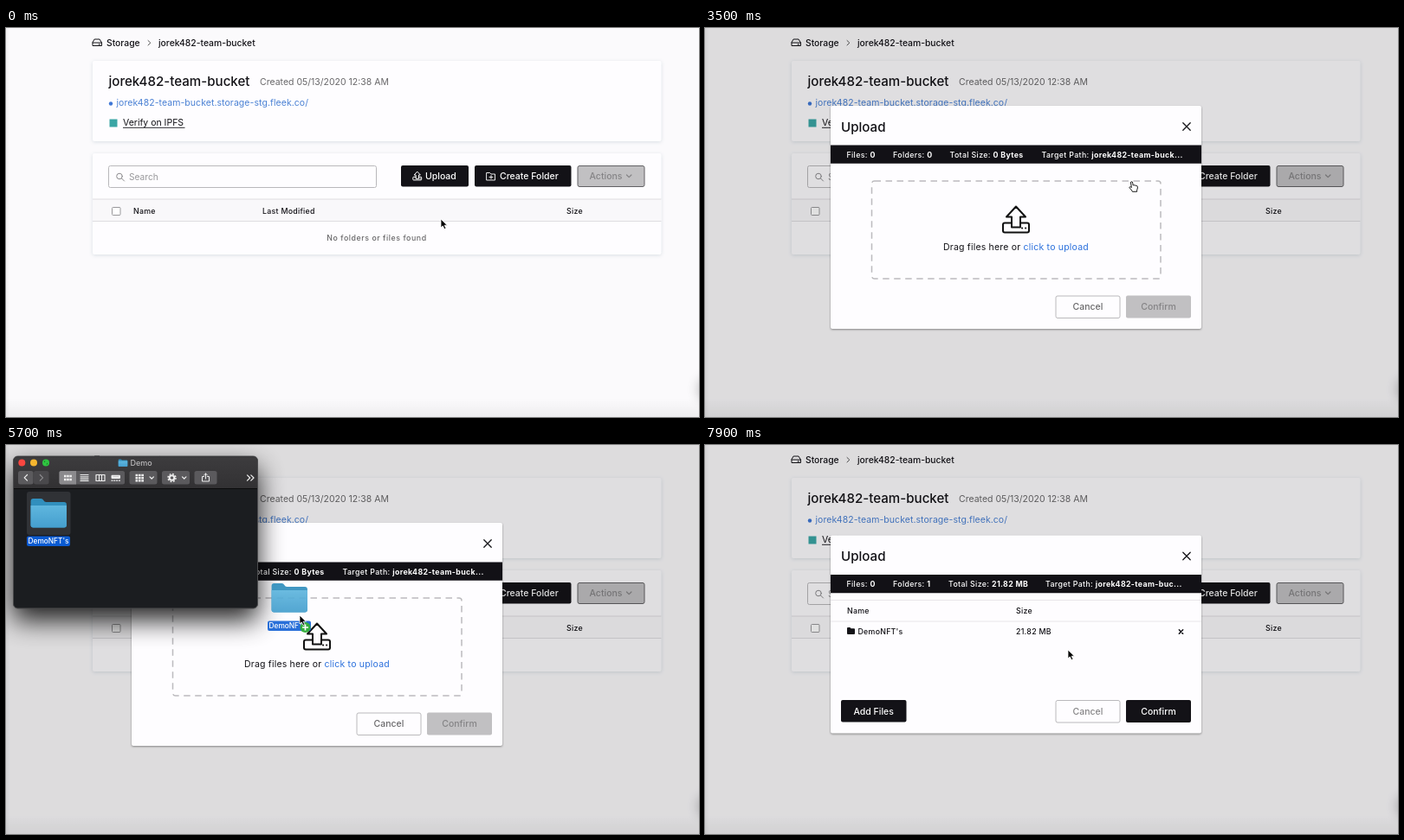
These frames come from a looping animation (800x450 px, 8 s). An HTML page:

```html
<!DOCTYPE html>
<html lang="en">
<head>
<meta charset="utf-8">
<title>Upload a folder</title>
<style>
html, body { margin: 0; width: 100%; height: 100%; overflow: hidden; background: #fbfafc; }
svg { display: block; width: 100vw; height: 100vh; }
text { font: 10.5px Inter, sans-serif; fill: #131217; white-space: pre; }
.title { font-size: 15.1px; font-weight: 500; }
.crumb { font-size: 10.35px; font-weight: 500; }
.med { font-weight: 500; }
.small { font-size: 8.8px; font-weight: 500; letter-spacing: .27px; }
.bar text { font-size: 8.8px; font-weight: 500; letter-spacing: .35px; fill: #fff; }
.bar tspan { font-weight: 700; }
.mid { text-anchor: middle; }
.mac { font-size: 8.3px; font-weight: 500; fill: #fff; }
.grey { fill: #69686a; }
.pale { fill: #858486; }
.white { fill: #fff; }
.blue { fill: #2b70dc; }
.line { fill: none; stroke: #131217; stroke-linecap: round; stroke-linejoin: round; }
.card { fill: #fefdff; filter: drop-shadow(0 1px 2px #28506428); }
.panel { fill: #fefdff; filter: drop-shadow(0 1px 1px #0006); }
</style>
</head>
<body>
<svg viewBox="0 0 800 450" preserveAspectRatio="none">
<defs>
  <linearGradient id="left"><stop stop-opacity=".045"/><stop offset="1" stop-opacity="0"/></linearGradient>
  <linearGradient id="low" x2="0" y2="1"><stop stop-opacity="0"/><stop offset="1" stop-opacity=".05"/></linearGradient>
  <linearGradient id="sky" x2="0" y2="1"><stop stop-color="#5fb6de"/><stop offset="1" stop-color="#459fce"/></linearGradient>
  <linearGradient id="steel" x2="0" y2="1"><stop stop-color="#3d3c3e"/><stop offset="1" stop-color="#323133"/></linearGradient>
  <filter id="blur" x="-100%" y="-100%" width="300%" height="300%"><feGaussianBlur stdDeviation="7"/></filter>
  <filter id="soft" x="-50%" y="-50%" width="200%" height="200%"><feGaussianBlur stdDeviation="15"/></filter>
  <symbol id="folder" viewBox="0 0 42 34" overflow="visible">
    <path d="M0 3q0-3 3-3h9q2 0 3 2t3 2h21q3 0 3 3v24q0 3-3 3H3q-3 0-3-3z" fill="#318fbd"/>
    <path d="M0 8h42v23q0 3-3 3H3q-3 0-3-3z" fill="url(#sky)"/>
  </symbol>
  <symbol id="tray" viewBox="0 0 32 32" overflow="visible">
    <path class="line" d="M11 25V13H5L16 1l11 12h-6v12zM11 20H3q-2 0-2 2v7q0 2 2 2h26q2 0 2-2v-7q0-2-2-2h-8M23 26h.2M27 26h.2" style="stroke:inherit"/>
  </symbol>
  <path id="cross" class="line" d="M-4.2-4.2 4.2 4.2M4.2-4.2-4.2 4.2"/>
</defs>

<rect width="800" height="450" fill="#fbfafc"/>
<path class="line" d="M102.5 13h5.500l2.500 4v3.500h-10.500v-3.500zM100 17h10.500M107 19h1.500"/>
<text class="crumb" x="116" y="21">Storage</text>
<path class="line" d="M164 14.500l2.800 2.700-2.800 2.700" style="stroke:#555"/>
<text class="crumb" x="176" y="21">jorek482-team-bucket</text>

<rect class="card" x="100" y="38" width="656.500" height="93" rx="2"/>
<text class="title" x="118.500" y="67">jorek482-team-bucket</text>
<text class="grey" x="293" y="66">Created 05/13/2020 12:38 AM</text>
<circle cx="121" cy="87.500" r="2.200" fill="#3f77d6"/>
<text x="127.500" y="90" style="fill:#4a80d4;letter-spacing:.06px">jorek482-team-bucket.storage-stg.fleek.co/</text>
<rect x="119.500" y="105.500" width="9" height="9" fill="#3aa6a5"/>
<text x="135" y="113">Verify on IPFS</text>
<path d="M135 115.300h71.500" stroke="#131217" stroke-width=".9"/>

<rect class="card" x="100" y="145" width="656.500" height="117" rx="2"/>
<rect x="118.500" y="159.500" width="309" height="25" rx="2" fill="#fefdff" stroke="#b9b8bb"/>
<g class="line" style="stroke:#8a898c"><circle cx="131" cy="171.500" r="3.300"/><path d="M133.500 174l3 3"/></g>
<text x="142" y="176" style="fill:#99989b;font-size:10.2px">Search</text>
<rect id="upload" x="456" y="159" width="78" height="24.500" rx="2"/>
<use href="#tray" x="469.500" y="165.500" width="10.500" height="11" stroke="#fff" stroke-width="3"/>
<text class="med white" x="484" y="174.500">Upload</text>
<rect x="541" y="159" width="111.500" height="24.500" rx="2" fill="#131217"/>
<path class="line" d="M555 167.500h3.500l1.500 1.500h4.500v7h-9.500zM558 172.500h4M560 170.500v4" style="stroke:#fff;stroke-width:.9"/>
<text class="med white" x="570" y="174.500">Create Folder</text>
<rect x="660" y="159.500" width="77" height="24" rx="2" fill="#c1c0c2" stroke="#626164"/>
<text class="med pale" x="673.500" y="174.500">Actions</text>
<path class="line" d="M716.500 170l2.700 2.700 2.700-2.700" style="stroke:#858486;stroke-width:1.200"/>
<path d="M100 198h656.500v25.500H100z" fill="#f9f8fa"/>
<path d="M100 198h656.500M100 223.500h656.500" stroke="#dedde1"/>
<rect x="122.500" y="207.500" width="9.500" height="9" rx="1" fill="#fff" stroke="#99989b"/>
<text class="small" x="147" y="214.500">Name</text>
<text class="small" x="296" y="214.500">Last Modified</text>
<text class="small" x="647" y="214.500">Size</text>
<text class="small grey mid" x="428" y="246.300" style="letter-spacing:.55px">No folders or files found</text>

<rect width="5" height="450" fill="url(#left)"/>
<rect y="428" width="800" height="22" fill="url(#low)"/>
<circle cx="813" cy="418" r="14" opacity=".25" filter="url(#blur)"/>

<g id="modal">
  <rect width="800" height="450" fill="#000" opacity=".122"/>
  <rect class="panel" id="panel" x="145" width="428" rx="2"/>
  <g id="head">
    <text class="title" x="157" y="29.500">Upload</text>
    <use href="#cross" x="556" y="24" stroke-width="1.300"/>
    <path d="M145 45.500h428v21.300H145z" fill="#121116"/>
  </g>
  <g id="drop">
    <g class="bar">
      <text x="163.500" y="149.500">Files: <tspan>0</tspan></text>
      <text x="217" y="149.500">Folders: <tspan>0</tspan></text>
      <text x="282.500" y="149.500">Total Size: <tspan>0 Bytes</tspan></text>
      <text x="388.500" y="149.500">Target Path: <tspan>jorek482-team-buck...</tspan></text>
    </g>
    <rect id="zone" x="192.500" y="177" width="333.500" height="113" rx="3" fill="none" stroke-width="1.500"/>
    <use href="#tray" x="343" y="205.500" width="32" height="32" stroke="#111" stroke-width="2"/>
    <text x="275" y="257" style="letter-spacing:.2px">Drag files here or <tspan class="blue">click to upload</tspan></text>
    <rect x="405" y="310" width="74" height="25.500" rx="2" fill="#fefdff" stroke="#bab9bc"/>
    <text class="med mid grey" x="442" y="326.300">Cancel</text>
    <rect x="486" y="309.500" width="75" height="26" rx="2" fill="#c1c0c2"/>
    <text class="med mid pale" x="523.500" y="326.300">Confirm</text>
  </g>
  <g id="list">
    <g class="bar">
      <text x="163.500" y="164">Files: <tspan>0</tspan></text>
      <text x="217" y="164">Folders: <tspan>1</tspan></text>
      <text x="281" y="164">Total Size: <tspan>21.82 MB</tspan></text>
      <text x="393" y="164">Target Path: <tspan>jorek482-team-buc...</tspan></text>
    </g>
    <path d="M145 179.500h428M145 204h428" stroke="#e8e6ea"/>
    <text class="small" x="164" y="194.500">Name</text>
    <text class="small" x="359" y="194.500">Size</text>
    <path d="M164 212q0-1 1-1h2.500l1 1.200h3.500q1 0 1 1v4.800q0 1-1 1h-7q-1 0-1-1z" fill="#131217"/>
    <text class="small" x="176.500" y="218.800">DemoNFT's</text>
    <text class="small" x="359" y="218.800">21.82 MB</text>
    <use href="#cross" transform="translate(549.500 216) scale(.52)" stroke-width="2.900"/>
    <rect x="157" y="295" width="75.500" height="25.500" rx="2" fill="#131217"/>
    <text class="med mid white" x="194.700" y="311.500">Add Files</text>
    <rect x="405" y="295.500" width="74" height="25.500" rx="2" fill="#fefdff" stroke="#bab9bc"/>
    <text class="med mid pale" x="442" y="312">Cancel</text>
    <rect x="486" y="295" width="75" height="26" rx="2" fill="#131217"/>
    <text class="med mid white" x="523.500" y="312">Confirm</text>
  </g>
</g>

<g id="finder">
  <rect x="8" y="26" width="283" height="177" rx="5" opacity=".85" filter="url(#soft)"/>
  <rect x="8.500" y="13" width="282" height="176" rx="5" fill="#1b1d20" stroke="#4c4c4e"/>
  <path d="M9 50V18.500q0-5 5-5h271q5 0 5 5V50z" fill="url(#steel)"/>
  <path d="M9 50.500h281" stroke="#0b0b0c"/>
  <circle cx="18.300" cy="20.500" r="4" fill="#fb4640"/>
  <circle cx="32" cy="20.500" r="4" fill="#f5b52f"/>
  <circle cx="46" cy="20.500" r="4" fill="#2fc441"/>
  <path d="M44 18.700l1.500-.2-1.500 1.700zM48 22.300l-1.500.2 1.500-1.700z" fill="#0a5c14"/>
  <use href="#folder" x="129.500" y="16.500" width="11" height="8.500"/>
  <text class="mac" x="143.500" y="24" style="font-size:9px;fill:#b9b8ba">Demo</text>
  <g fill="#5b5a5d">
    <rect x="14" y="30" width="17.500" height="15.500" rx="2.500"/>
    <rect x="32" y="30" width="17.500" height="15.500" rx="2.500" fill="#4a494c"/>
    <rect x="61.500" y="30" width="75.500" height="15.500" rx="2.500"/>
    <path d="M63.500 30h17.500v15.500h-17.500q-2 0-2-2v-11.500q0-2 2-2z" fill="#8b8a8d"/>
    <rect x="142.500" y="30" width="32" height="15.500" rx="2.500"/>
    <rect x="180" y="30" width="32" height="15.500" rx="2.500"/>
    <rect x="217.500" y="30" width="26" height="15.500" rx="2.500"/>
  </g>
  <g class="line" style="stroke:#eee;stroke-width:1.200">
    <path d="M24.500 34.500l-3.300 3.300 3.300 3.300M166 36.800l2.200 2.200 2.200-2.200M203.500 36.800l2.200 2.200 2.200-2.200M278.500 34.800l3.200 3.200-3.200 3.200M282.800 34.800l3.200 3.200-3.200 3.200M86 34.500h9M86 36.800h9M86 39.100h9M86 41.400h9M104 34.500h10v7h-10zM107.500 34.500v7M110.500 34.500v7"/>
    <path d="M39.300 34.500l3.300 3.300-3.300 3.300" style="stroke:#8b8a8d"/>
    <g stroke-linecap="butt">
      <path d="M67 36h9M67 40h9" style="stroke-width:2.700;stroke-dasharray:2.500 .7"/>
      <path d="M149.500 35h9.500M149.500 38.200h9.500M149.500 41.400h9.500" style="stroke-width:2.400;stroke-dasharray:2.700 .7"/>
      <path d="M121.500 41.200h10.500" style="stroke-dasharray:2 .8"/>
      <circle cx="191.500" cy="38" r="4.500" style="stroke-width:1.500;stroke-dasharray:1.770 1.770"/>
    </g>
    <path d="M122.500 35.700h8.500v2.300h-8.500z" style="stroke-width:2"/>
    <circle cx="191.500" cy="38" r="2.800" style="stroke-width:2"/>
    <path id="share" d="M228.500 36.500h-2v5.500h8v-5.500h-2M230.500 39v-6M228.500 35l2-2 2 2" style="stroke-width:1"/>
  </g>
  <g id="picked">
    <rect x="24" y="54" width="50.500" height="50" rx="3" fill="#303236"/>
    <rect x="24" y="105.500" width="50" height="11.500" rx="2" fill="#0a5bd3"/>
  </g>
  <use href="#folder" x="28.500" y="62" width="41.500" height="33.500"/>
  <text class="mac mid" x="49" y="114">DemoNFT's</text>
</g>

<g id="ghost" opacity=".92">
  <rect x="24" y="105.500" width="50" height="11.500" rx="2" fill="#1764d6"/>
  <use href="#folder" x="28.500" y="62" width="41.500" height="33.500"/>
  <text class="mac mid" x="49" y="114">DemoNFT's</text>
  <circle cx="67.500" cy="113" r="6" fill="#24a72e"/>
  <path d="M64 113h7M67.500 109.500v7" stroke="#fff" stroke-width="1.700"/>
</g>

<path id="arrow" d="M0 0v10l2.300-2.100 1.700 3.700 1.900-.8-1.700-3.600h3.200z" stroke="#fff" stroke-width=".8"/>
<path id="hand" d="M-2.500 0q0-1.300 1-1.300t1.200 1.300l.5 3q1-.7 1.800.1 1.200-.5 1.700.4 1.600-.2 1.700 1.300 0 2.500-.8 3.700v1.800h-5.200q-.8-2.200-3-4-.9-1 0-1.500.8-.3 2 .8z" fill="#fff" stroke="#000" stroke-width=".9"/>
</svg>
<script>
const $ = id => document.getElementById(id);
const show = (id, on) => $(id).style.display = on ? "" : "none";
const set = (id, attrs) => { for (const k in attrs) $(id).setAttribute(k, attrs[k]); };
const ease = p => p * p * (3 - 2 * p);

// time, x, y of the pointer tip
const path = [
  [0, 502, 221], [400, 494, 179], [3700, 494, 179], [4500, 55, 106], [4700, 55, 106], [4900, 61, 99],
  [5700, 339, 197], [6000, 356, 216], [7400, 356, 216], [7900, 419, 237], [8000, 419, 237]
];

function pointer(t) {
  const i = path.findIndex(p => p[0] > t);
  const [t0, x0, y0] = path[i - 1], [t1, x1, y1] = path[i];
  const p = ease((t - t0) / (t1 - t0));
  return [x0 + (x1 - x0) * p, y0 + (y1 - y0) * p];
}

function draw(now) {
  const t = Math.floor(now % 8000 / 100) * 100;
  const [x, y] = pointer(t);
  const hand = t >= 300 && t < 3800;
  const listed = t >= 6700, over = t >= 5800, drag = t >= 4900 && t < 6000;
  const top = listed ? 104.5 : 90;

  set("upload", { fill: hand ? "#3c3b3e" : "#131217" });
  show("modal", t >= 1900);
  set("modal", { opacity: Math.min(1, (t - 1800) / 300) });
  set("panel", { y: top, height: listed ? 229 : 258 });
  set("head", { transform: `translate(0 ${top})` });
  show("drop", !listed);
  show("list", listed);
  set("zone", { stroke: over ? "#2a6fd0" : "#bcbbbe", "stroke-dasharray": over ? "none" : "7.5 5.5" });

  show("finder", t >= 3600 && t < 6000);
  show("picked", t >= 4800);
  set("share", { opacity: t >= 4800 ? 1 : .35 });
  show("ghost", drag);
  set("ghost", { transform: `translate(${x - 61} ${y - 99})` });

  show("hand", hand);
  show("arrow", !hand);
  set(hand ? "hand" : "arrow", { transform: `translate(${x} ${y})` });
  requestAnimationFrame(() => draw(performance.now()));
}
draw(0);
</script>
</body>
</html>
```
